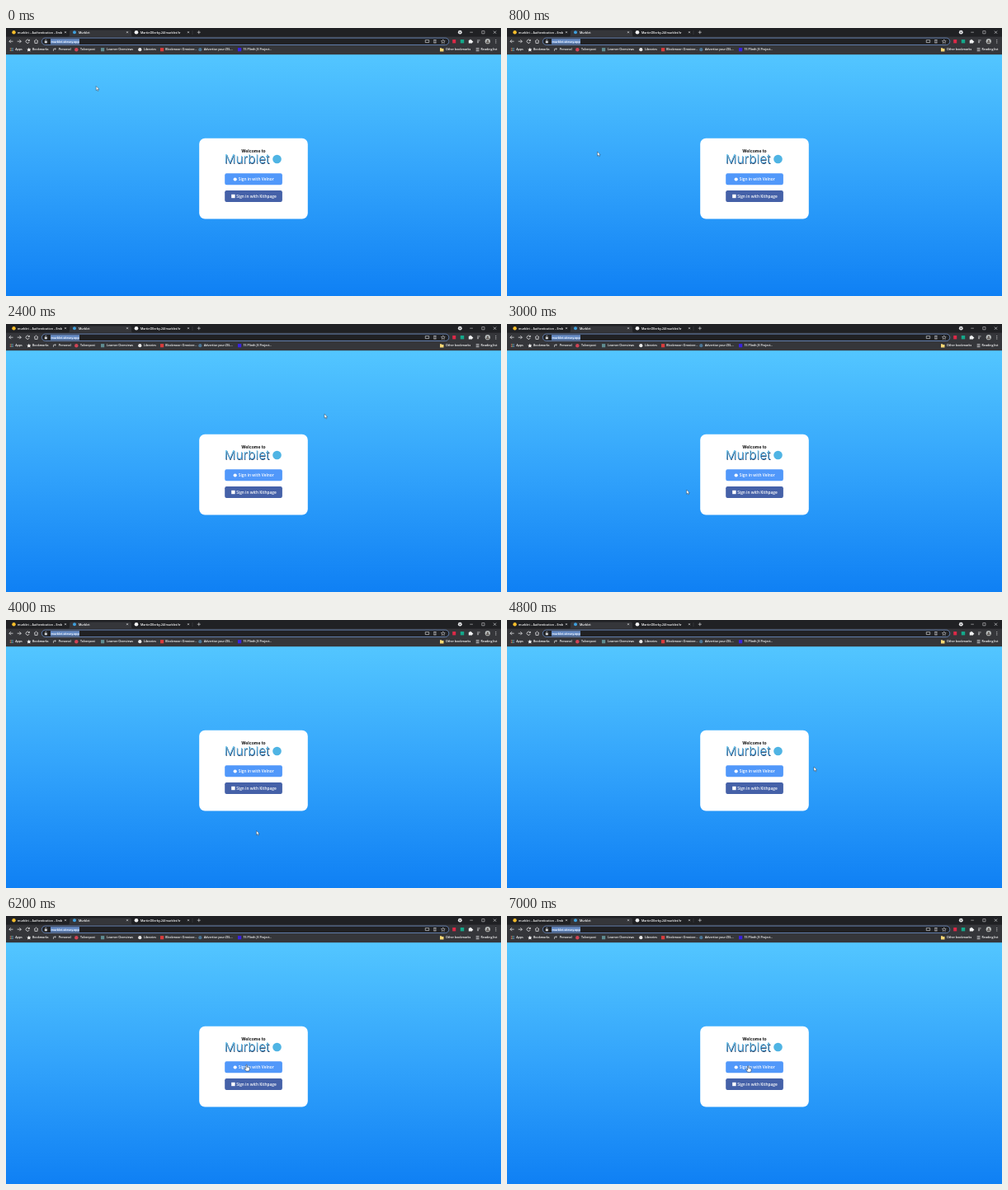
Recreate the animation shown at these times as an HTML page. Size 600 by 325 pixels, loop 8 s.

```html
<!DOCTYPE html>
<html lang="en">
<head>
<meta charset="utf-8">
<title>Sign in</title>
<style>
  html, body { margin: 0; width: 100%; height: 100%; overflow: hidden; background: #202124; }
  svg { display: block; width: 100%; height: 100%; }
  text { font-family: "Open Sans", "Noto Sans", sans-serif; }
  .ui { font-size: 3.55px; font-weight: 600; fill: #fff; }
  .line { fill: none; stroke: #e8e9eb; stroke-width: .75; }
  .btn { font-size: 4.8px; font-weight: 600; fill: #fff; }
  .inter { font-family: Inter, sans-serif; }
</style>
</head>
<body>
<svg id="stage" viewBox="0 0 600 325" preserveAspectRatio="none">
  <defs>
    <linearGradient id="sky" x1="0" y1="0" x2="0" y2="1">
      <stop offset="0" stop-color="#53c6ff"/>
      <stop offset=".5" stop-color="#32a3fb"/>
      <stop offset="1" stop-color="#0f80f4"/>
    </linearGradient>
    <linearGradient id="word" x1="0" y1="0" x2="0" y2="1">
      <stop offset=".2" stop-color="#74cdf5"/>
      <stop offset="1" stop-color="#1b78c2"/>
    </linearGradient>
  </defs>

  <rect width="600" height="33" fill="#35363a"/>
  <rect width="600" height="10.6" fill="#202124"/>
  <path d="M75 10.6Q77 10.6 77 8.6V4.5Q77 2.5 79 2.5H150Q152 2.5 152 4.5V8.6Q152 10.6 154 10.6Z" fill="#35363a"/>
  <path d="M226 3V8" stroke="#55575c" stroke-width=".4"/>
  <rect y="32.2" width="600" height="292.8" fill="url(#sky)"/>

  <rect x="43.4" y="12.1" width="493.4" height="8.4" rx="4.2" fill="#202124" stroke="#7fa9ec" stroke-width=".65"/>
  <rect x="54" y="13.2" width="35" height="6.3" fill="#668bc4"/>
  <g id="chrome"></g>

  <rect x="234.2" y="133.7" width="131.6" height="97.8" rx="7" fill="#fff"/>
  <text class="inter" x="300" y="150.6" text-anchor="middle" font-size="5.1" font-weight="700" fill="#111">Welcome to</text>
  <g font-size="15" font-weight="300" letter-spacing=".2">
    <text class="inter" x="265.3" y="164.9" fill="#1b3558">Murblet</text>
    <text class="inter" x="264.8" y="164.3" fill="url(#word)">Murblet</text>
  </g>
  <circle cx="328.5" cy="159" r="5.3" fill="#4fb4e4"/>

  <rect x="265.2" y="176.3" width="69.7" height="14" rx="2.2" fill="#5198fa"/>
  <circle cx="277.7" cy="183.5" r="2.1" fill="#fff"/>
  <text class="btn" x="281.8" y="185.4">Sign in with Velnor</text>
  <rect x="265.2" y="197" width="69.7" height="14" rx="2.2" fill="#4561a8"/>
  <rect x="273.2" y="201.8" width="4.4" height="4.4" fill="#fff"/>
  <text class="btn" x="279.2" y="206">Sign in with Kithpage</text>

  <g id="pointer" stroke-linejoin="round" fill="#fff" stroke="#1c2733">
    <path id="arrow" d="M0 0V5.2L1.2 4.1L2 6L2.9 5.6L2.1 3.8H3.7Z" stroke-width=".4"/>
    <path id="hand" d="M-.6 .5Q0-.4 .6 .5V3L1.7 3.1L2.8 3.4L3.8 3.9V5.7L3.1 7.8H-.6L-2.5 5.1Q-2.4 4-1.5 4.5L-.6 5.3Z" stroke-width=".5"/>
  </g>
</svg>
<script>
const $ = id => document.getElementById(id);
const chrome = $("chrome");

function add(tag, attrs, text) {
  const el = document.createElementNS("http://www.w3.org/2000/svg", tag);
  for (const k in attrs) el.setAttribute(k, attrs[k]);
  if (text) el.textContent = text;
  chrome.append(el);
}
const label = (x, y, text) => add("text", { class: "ui", x, y }, text);
const dot = (cx, cy, r, fill) => add("circle", { cx, cy, r, fill });
const box = (x, y, width, height, fill) => add("rect", { x, y, width, height, fill });
const shape = (d, fill) => add("path", { d, fill });
const line = (d, width = .75) => add("path", { d, class: "line", style: `stroke-width:${width}` });
const cross = (x, y, s) => line(`M${x - s} ${y - s}l${2 * s} ${2 * s}m0 ${-2 * s}l${-2 * s} ${2 * s}`, .6);

// Tabs
dot(9.5, 5.2, 2.2, "#f6bd2b");
label(14, 6.5, "murblet – Authentication – Emb");
dot(83, 5.2, 2, "#3f9fdc");
label(88, 6.5, "Murblet");
dot(158, 5.2, 2.3, "#f3f3f3");
label(163, 6.5, "MartinOllerby-24/murblet/tr");
[72, 147, 221].forEach(x => cross(x, 5.2, 1));
line("M231.8 5.2h4m-2-2v4", .6);

// Window controls
dot(550.3, 5.2, 2.4, "#e2e3e5");
shape("M549.1 4.7h2.4l-1.2 1.4Z", "#202124");
line("M562.3 5.2h3.6", .5);
line("M576.8 3.6h3.2v3.2h-3.2Z", .5);
cross(592.5, 5.2, 1.6);

// Toolbar
line("M8.5 16.2h-4.6m2-2l-2 2l2 2");
line("M13.7 16.2h4.6m-2-2l2 2l-2 2");
line("M28 15.1a2.1 2.1 0 1 0 .2 1.8m.2-3v1.6h-1.7");
line("M34 16.2l2.5-2.2l2.5 2.2m-4.1-.6v2.8h3.2v-2.8");
box(46.8, 15.9, 3, 2.4, "#d5d7da");
line("M47.5 15.9v-1a.8 .8 0 0 1 1.6 0v1", .5);
label(54.6, 17.7, "murblet.sitevoy.app");
line("M508.3 14.6h4.4v3h-4.4Z", .6);
line("M518.3 14.5h3.2m-3.2 3.5h3.2m-2.6-3.5v3.5m2-3.5v3.5", .6);
line("M529.8 13.9l.7 1.6 1.7.2-1.3 1.1.4 1.7-1.5-.9-1.5.9.4-1.7-1.3-1.1 1.7-.2Z", .5);
box(541.2, 14, 4, 4.4, "#dd2947");
box(550.8, 14, 4.4, 4.4, "#14a88a");
shape("M560.8 14.8h1.4a.8 .8 0 1 1 1.5 0h1.3v1.2a.8 .8 0 1 1 0 1.4v1h-4.2Z", "#f0f1f2");
line("M571 14.9h3.6m-3.6 1.4h2.3m-2.3 1.4h2", .6);
dot(583.8, 16.2, 3.1, "#b9bdbd");
dot(583.8, 15.4, 1, "#5b5552");
shape("M581.7 18.3a2.1 2 0 0 1 4.2 0Z", "#5b5552");
[14.5, 16.2, 17.9].forEach(y => dot(593.8, y, .5, "#f0f1f2"));

// Bookmarks
for (let i = 0; i < 9; i++)
  box(4.8 + i % 3 * 1.4, 24.2 + Math.floor(i / 3) * 1.4, 1, 1, ["#e56b5d", "#62b77a", "#6e9fe8"][i % 3]);
shape("M27.8 23.8l.8 1.6 1.8.2-1.3 1.2.4 1.8-1.7-.9-1.7.9.4-1.8-1.3-1.2 1.8-.2Z", "#f4f4f4");
line("M57.5 28v-2.6h2.7m-1-1l1.2 1-1.2 1", .6);
dot(85.3, 26.2, 2.2, "#cf4456");
box(115, 24.1, 4.2, 4.2, "#5f8c91");
dot(162.3, 26.2, 2.1, "#e8e8e8");
box(187, 24.1, 4.2, 4.2, "#d93c3c");
dot(235.3, 26.2, 2.1, "#4c7696");
box(281, 24.1, 4.2, 4.2, "#3a22df");
shape("M526 24.3h1.8l.6.7h2.1v3.4h-4.5Z", "#f7d774");
line("M569.7 24.6h3.8m-3.8 1.6h3.8m-3.8 1.6h3.8", .7);
[[11.2, "Apps"], [32, "Bookmarks"], [63.7, "Personal"], [90, "Tolverpost"],
 [122, "Learner Overviews"], [167, "Libraries"], [193.2, "Blockmoor: Omniver..."],
 [240, "Advertise your ZEL..."], [287.5, "15 Plinth JS Project..."],
 [533, "Other bookmarks"], [575.6, "Reading list"]
].forEach(([x, text]) => label(x, 27.4, text));

// Pointer path: time, x, y
const STEP = 200, LOOP = 8000;
const path = [
  [0, 109.2, 70.5], [800, 109.5, 150], [1200, 106, 138], [1400, 122, 146],
  [1800, 215.3, 144], [2200, 340, 107], [2400, 386, 109], [2600, 368, 147],
  [3000, 217.6, 201], [3200, 221, 234], [3600, 240, 243], [4000, 303.5, 255.5],
  [4200, 350, 236], [4400, 386, 175], [4600, 381, 104], [4800, 372, 178],
  [5000, 364, 214], [5200, 336, 229], [5600, 293, 188.3], [6000, 291.5, 180],
  [6200, 291.5, 180.2], [6400, 291.5, 180.2], [6600, 291.7, 181], [6800, 291.7, 181],
  [7000, 292.3, 181.5], [LOOP, 292.3, 181.5]
];

function pointAt(t) {
  const i = path.findIndex(p => p[0] > t);
  const [t0, x0, y0] = path[i - 1], [t1, x1, y1] = path[i];
  const k = (t - t0) / (t1 - t0);
  return [x0 + (x1 - x0) * k, y0 + (y1 - y0) * k];
}

const onButton = (x, y) => x > 265 && x < 335 && (y > 176.3 && y < 190.3 || y > 197 && y < 211);

function draw(ms) {
  const [x, y] = pointAt(Math.floor(ms % LOOP / STEP) * STEP);
  const hover = onButton(x, y);
  $("pointer").setAttribute("transform", `translate(${x} ${y})`);
  $("arrow").style.display = hover ? "none" : "";
  $("hand").style.display = hover ? "" : "none";
}

const start = performance.now();
function tick() {
  draw(performance.now() - start);
  requestAnimationFrame(tick);
}
tick();
</script>
</body>
</html>
```
